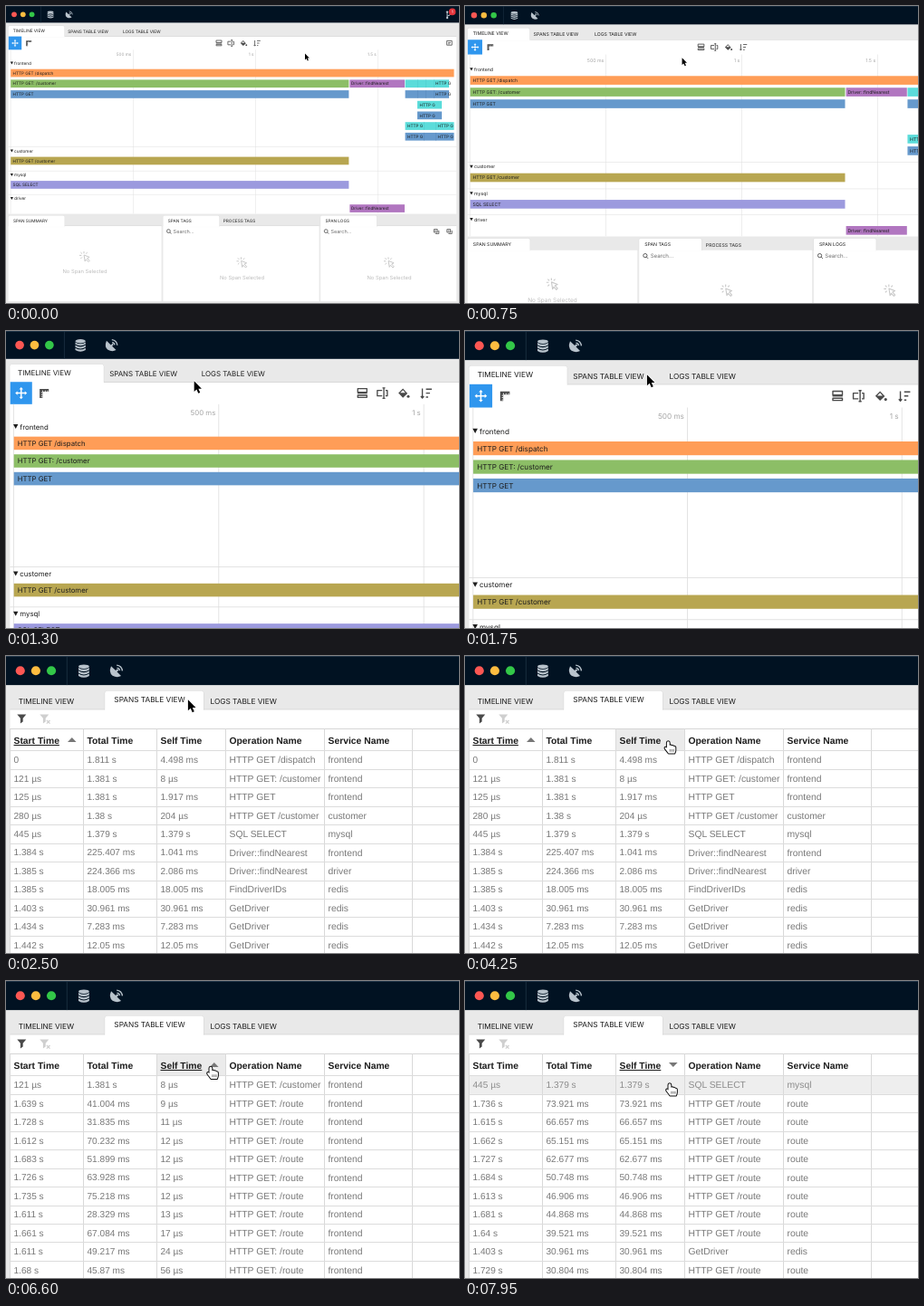
Animation, 500 px wide and 328 px high, one loop 8 s. Source, as an HTML page with a canvas:

```html
<!DOCTYPE html>
<html lang="en">
<head>
<meta charset="utf-8">
<title>Trace viewer</title>
<style>
html, body { margin: 0; width: 100%; height: 100%; overflow: hidden; background: #e9e9e9; }
canvas { display: block; width: 500px; height: 328px; }
</style>
</head>
<body>
<canvas id="stage" width="500" height="328"></canvas>
<script>
const ctx = document.getElementById('stage').getContext('2d');
const LOOP = 8000, ZOOM = 1.75;
const UI = 'Inter, "Open Sans", sans-serif';
const GRID = '"Liberation Sans", Arial, sans-serif';
const INK = '#1d1d1d', STRIP = '#e9e9e9', EDGE = '#d2d2d2', ICON = '#4a4a4a', PALE = '#b9c3cc';

// Moments of the interaction, in ms
const OPEN_TABLE = 1950, SORT_UP = 5500, SORT_DOWN = 7000;

const clamp = v => Math.min(1, Math.max(0, v));
const mix = (a, b, k) => a + (b - a) * k;
const progress = (t, start, length) => clamp((t - start) / length);
const swing = k => (1 - Math.cos(Math.PI * k)) / 2;
const easeOut = k => 1 - (1 - k) * (1 - k);

function box(color, x, y, w, h) {
  ctx.fillStyle = color;
  ctx.fillRect(x, y, w, h);
}

function disc(color, x, y, r) {
  ctx.fillStyle = color;
  ctx.beginPath();
  ctx.arc(x, y, r, 0, 7);
  ctx.fill();
}

// y is the middle of the capital letters
function label(str, x, y, size, color = INK, align = 'left', font = UI, weight = 400) {
  ctx.font = `${weight} ${size}px ${font}`;
  ctx.fillStyle = color;
  ctx.textAlign = align;
  ctx.fillText(str, x, y + size * 0.36);
}

// Draws an SVG path at a place, filled and/or stroked
function shape(d, x, y, { fill, stroke, width = 0.8, scale = 1 }) {
  const path = new Path2D(d);
  ctx.save();
  ctx.translate(x, y);
  ctx.scale(scale, scale);
  ctx.lineWidth = width;
  ctx.lineJoin = 'round';
  if (stroke) { ctx.strokeStyle = stroke; ctx.stroke(path); }
  if (fill) { ctx.fillStyle = fill; ctx.fill(path); }
  ctx.restore();
}

function tab(x, y, w, h) {
  ctx.beginPath();
  ctx.roundRect(x, y, w, h, [1.5, 1.5, 0, 0]);
  ctx.strokeStyle = EDGE;
  ctx.lineWidth = 0.5;
  ctx.stroke();
  ctx.fillStyle = '#fff';
  ctx.fill();
  ctx.fillRect(x, y + h - 0.5, w, 1.2);
}

function titleBar() {
  box('#011222', 0, 0, 500, 18.35);
  box('#2b4257', 0, 0, 500, 0.4);
  ['#fc5753', '#fdbc40', '#33c748'].forEach((c, i) => disc(c, 9 + i * 9.8, 9.3, 2.9));
  box('#23384b', 38.2, 0, 0.4, 18.35);

  // Database
  ctx.fillStyle = PALE;
  ctx.beginPath();
  ctx.ellipse(49.1, 6.7, 3.4, 1.3, 0, 0, 7);
  ctx.fill();
  for (let i = 0; i < 3; i++) {
    shape('M-3.4 0 Q0 2.2 3.4 0 V1.3 Q0 3.4 -3.4 1.3 Z', 49.1, 7.4 + i * 1.9, { fill: PALE });
  }

  // Dish
  shape('M-3.3 -3 Q-5 1 -2.4 3 Q0.4 4.6 3 3.2 L0.4 0.6 L1.4 -0.4 L0.6 -1.2 L-0.4 -0.2 Z', 69.6, 9.4, { fill: PALE });
  shape('M0.2 -3.6 Q3.4 -3.2 3.8 0 M0.4 -1.9 Q1.9 -1.7 2.1 -0.2', 69.6, 9.4, { stroke: PALE });

  // Branches with a notification badge
  shape('M-2 -2.5 V3 M2 -2 Q2 1 -2 1.5', 489, 9.6, { stroke: PALE, width: 1 });
  disc(PALE, 487, 6.6, 1.2);
  disc(PALE, 487, 13, 1.2);
  disc('#e2343b', 492.6, 6.4, 3.8);
  label('1', 492.6, 6.4, 4.6, '#fff', 'center');
}

function mainTabs(table) {
  box(STRIP, 0, 18.3, 500, 309.7);
  box(EDGE, 2.6, 33.5, 494.6, 0.5);
  box('#fff', 2.6, 34, 494.6, 195.6);
  if (table) tab(62.4, 22, 62.2, 12); else tab(2.6, 22, 61.8, 12);
  const names = ['TIMELINE VIEW', 'SPANS TABLE VIEW', 'LOGS TABLE VIEW'];
  [7.8, 68.2, 128.9].forEach((x, i) =>
    label(names[i], x, i === +table ? 27.6 : 28.3, 4.73));
}

function timelineTools() {
  box('#2f96ee', 2.8, 33.6, 14.4, 14.7);
  shape('M-3 0 H3 M0 -3 V3', 10, 41, { stroke: '#fff', width: 0.9 });
  for (let i = 0; i < 4; i++) {
    ctx.save();
    ctx.translate(10, 41);
    ctx.rotate(i * Math.PI / 2);
    shape('M-1.3 -2.4 L0 -3.9 L1.3 -2.4 Z', 0, 0, { fill: '#fff' });
    ctx.restore();
  }
  shape('M-2.8 3.2 V-2.8 H3.2 V-0.9 H-0.9 V3.2 Z', 25, 41, { fill: ICON });
  for (let i = 0; i < 3; i++) {
    box('#fff', 24 + i * 1.6, 39.2, 0.5, 0.9);
    box('#fff', 23.2, 40.4 + i * 1.4, 0.9, 0.5);
  }

  const line = { stroke: ICON, width: 0.8 };
  shape('M-3 -3 H3 V-0.6 H-3 Z M-3 2.8 H3 V1.4 H-3 Z', 235, 41, line);
  box(ICON, 231.8, 40.6, 6.4, 0.8);
  shape('M0.2 -1.8 H-3 V1.8 H0.2 M2.4 -1.8 H3.6 V1.8 H2.4 M0.4 -3.4 H2.2 M1.3 -3.4 V3.4 M0.4 3.4 H2.2',
    247.9, 41, line);
  shape('M-3 0 L0 -3 L3 0.2 L0 3 Z', 261.8, 41, { fill: ICON });
  shape('M-1.8 -0.2 L0 -2 L1.6 -0.2 Z', 261.8, 41, { fill: '#fff' });
  disc(ICON, 265.3, 43.2, 0.9);
  shape('M-2.4 -3 V3 M-3.4 2 L-2.4 3.2 L-1.4 2 M0 -2.6 H3.8 M0 0 H2.6 M0 2.6 H1.4', 277, 41, line);
  shape('M-2.8 -2.6 H2.8 V2.2 H-2.8 Z M-1.4 -0.6 H1.4 M-1.4 0.9 H0.4', 489.4, 41, line);
}

function bar(color, row, x, end, text = '', textX = x + 2.4) {
  box(color, x, row - 4.4, end - x, 8.7);
  if (text) label(text, textX, row, 4.65);
}

function timeline() {
  timelineTools();
  ['', '500 ms', '1 s', '1.5 s'].forEach((name, i) => {
    const x = 4.8 + i * 135.25;
    box('#dfdfdf', x, 48.3, 0.5, 181);
    label(name, x - 1.8, 53.8, 4.7, '#a5a5a5', 'right');
  });

  const groups = { frontend: 63, customer: 160, mysql: 186.5, driver: 212.5 };
  for (const [name, y] of Object.entries(groups)) {
    if (y > 63) box('#dedede', 2.6, y - 4.6, 494.6, 0.5);
    shape('M-1.6 -1.4 H1.6 L0 1.6 Z', 6.4, y, { fill: INK });
    label(name, 9.1, y + 0.2, 4.7);
  }

  const cyan = '#5bdcda', blue = '#6699cc', purple = '#b176c0';
  const row = i => 74.1 + i * 11.7;
  bar('#ff9d57', row(0), 5.2, 494.5, 'HTTP GET /dispatch');
  bar('#8cbe66', row(1), 5.2, 378.4, 'HTTP GET: /customer');
  bar(blue, row(2), 5.2, 378.4, 'HTTP GET');
  bar(purple, row(1), 379.4, 440, 'Driver::findNearest', 381);
  [cyan, blue].forEach((c, i) => {
    bar(c, row(1 + i), 440.6, 489, 'HTTP G', 474);
    bar(c, row(3 + i), 454, 481, 'HTTP G', 456.5);
    bar(c, row(5 + i), 440.6, 494.5, 'HTTP G', 443);
    label('HTTP G', 476.5, row(5 + i), 4.65);
    const edge = i ? '#5687bb' : '#4fc9ca';
    [454, 463.5, 472.5].forEach(x => box(edge, x, row(1 + i) - 4.4, 0.5, 8.7));
    [461, 474.5].forEach(x => box(edge, x, row(5 + i) - 4.4, 0.5, 8.7));
  });
  bar('#b8a651', 171, 5.2, 378.4, 'HTTP GET /customer');
  bar('#9c9ade', 197.5, 5.2, 378.4, 'SQL SELECT');
  bar(purple, 223.6, 379.4, 440, 'Driver::findNearest', 381);
}

function emptyNote(x, y) {
  const grey = '#c9c9c9';
  shape('M-1.5 -2 L4.5 0.4 L2 1.6 L4.6 4.4 L3.4 5.6 L0.8 2.8 L-0.4 5 Z', x + 0.6, y - 1, { stroke: grey, width: 1 });
  shape('M-1 -7 V-4.6 M-6 -2.6 H-3.6 M-4.6 -6 L-3 -4.4 M2.8 -6 L1.2 -4.4 M-4.6 1 L-3 -0.6', x, y,
    { stroke: grey, width: 1 });
  label('No Span Selected', x, y + 15.2, 5.8, '#bcbcbc', 'center');
}

function search(x) {
  ctx.strokeStyle = ICON;
  ctx.lineWidth = 0.8;
  ctx.beginPath();
  ctx.arc(x, 248.6, 1.9, 0, 7);
  ctx.moveTo(x + 1.4, 250);
  ctx.lineTo(x + 3, 251.6);
  ctx.stroke();
  label('Search...', x + 5.2, 249.2, 5.5, '#6c6c6c');
}

function detailPanels() {
  [[2.6, 171.6, 'SPAN SUMMARY'], [173.4, 345.6, 'SPAN TAGS'], [347.2, 497.2, 'SPAN LOGS']]
    .forEach(([x, end, name]) => {
      box(EDGE, x, 242.6, end - x, 0.5);
      box('#fff', x, 243.1, end - x, 83);
      tab(x, 231.6, 62, 12);
      label(name, x + 5.4, 237, 4.7);
    });
  label('PROCESS TAGS', 239.8, 237.8, 4.7);
  search(179.4);
  search(353.2);
  [475, 489.4].forEach(x =>
    shape('M-2.6 -2.4 H1.2 V1 H-2.6 Z M-1 2.4 H2.8 V-1 M-1.6 -0.7 H0.2', x, 249, { stroke: ICON, width: 0.8 }));
  emptyNote(87, 278);
  emptyNote(260.5, 284.4);
  emptyNote(423, 284.4);
}

const HEADS = ['Start Time', 'Total Time', 'Self Time', 'Operation Name', 'Service Name'];
const EDGES = [4, 85, 166, 242, 351, 448];
const ROW_TOP = 104.4, ROW = 20.45;

const table = str => str.trim().split('\n').map(r => r.split('|'));
const byStart = table(`
0|1.811 s|4.498 ms|HTTP GET /dispatch|frontend
121 µs|1.381 s|8 µs|HTTP GET: /customer|frontend
125 µs|1.381 s|1.917 ms|HTTP GET|frontend
280 µs|1.38 s|204 µs|HTTP GET /customer|customer
445 µs|1.379 s|1.379 s|SQL SELECT|mysql
1.384 s|225.407 ms|1.041 ms|Driver::findNearest|frontend
1.385 s|224.366 ms|2.086 ms|Driver::findNearest|driver
1.385 s|18.005 ms|18.005 ms|FindDriverIDs|redis
1.403 s|30.961 ms|30.961 ms|GetDriver|redis
1.434 s|7.283 ms|7.283 ms|GetDriver|redis
1.442 s|12.05 ms|12.05 ms|GetDriver|redis`);
const bySelfUp = table(`
121 µs|1.381 s|8 µs|customer
1.639 s|41.004 ms|9 µs
1.728 s|31.835 ms|11 µs
1.612 s|70.232 ms|12 µs
1.683 s|51.899 ms|12 µs
1.726 s|63.928 ms|12 µs
1.735 s|75.218 ms|12 µs
1.611 s|28.329 ms|13 µs
1.661 s|67.084 ms|17 µs
1.611 s|49.217 ms|24 µs
1.68 s|45.87 ms|56 µs`)
  .map(([start, total, self, path = 'route']) => [start, total, self, 'HTTP GET: /' + path, 'frontend']);
const bySelfDown = table(`
445 µs|1.379 s|SQL SELECT|mysql
1.736 s|73.921 ms
1.615 s|66.657 ms
1.662 s|65.151 ms
1.727 s|62.677 ms
1.684 s|50.748 ms
1.613 s|46.906 ms
1.681 s|44.868 ms
1.64 s|39.521 ms
1.403 s|30.961 ms|GetDriver|redis
1.729 s|30.804 ms`)
  .map(([start, time, op = 'HTTP GET /route', service = 'route']) => [start, time, time, op, service]);

// The table is only seen at full zoom, so it is laid out in stage pixels
function spansTable(t, pointer) {
  box('#fff', 5, 60, 495, 268);
  const funnel = 'M-5 -5 H5 L1.4 -0.6 V3 L-1.4 5 V-0.6 Z';
  shape(funnel, 17.3, 69.4, { fill: '#4a4a4a' });
  shape(funnel, 42.3, 69.4, { fill: '#cfcfcf' });
  shape('M2.6 1.6 L6.2 5.2 M6.2 1.6 L2.6 5.2', 42.3, 69.4, { stroke: '#cfcfcf', width: 1.3 });

  const sorted = t < SORT_UP ? 0 : 2;
  const rows = t < SORT_UP ? byStart : t < SORT_DOWN ? bySelfUp : bySelfDown;
  const headHover = pointer.y > 80 && pointer.y < ROW_TOP;
  const hoverRow = pointer.y > ROW_TOP ? Math.floor((pointer.y - ROW_TOP) / ROW) : -1;

  if (headHover) box('#ebebeb', EDGES[2], 80, EDGES[3] - EDGES[2], 24);
  if (hoverRow >= 0) box('#eeeeee', 4, ROW_TOP + hoverRow * ROW, 496, ROW);
  box('#d6d6d6', 4, 80, 496, 1);
  EDGES.forEach(x => box('#d9d9d9', x, 80, 1, 248));
  rows.forEach((_, i) => box('#dcdcdc', 4, Math.round(ROW_TOP + i * ROW), 496, 1));

  HEADS.forEach((name, i) => {
    const x = EDGES[i] + 4.5;
    label(name, x, 92.8, 10.35, INK, 'left', GRID, 700);
    if (i !== sorted) return;
    box(INK, x, 98, ctx.measureText(name).width, 1);
    const d = t < SORT_DOWN ? 'M0 5 L4.8 0 L9.6 5 Z' : 'M0 0 L4.8 5 L9.6 0 Z';
    shape(d, EDGES[i + 1] - 17, 90, { fill: '#777' });
  });
  rows.forEach((cells, r) => cells.forEach((cell, c) =>
    label(cell, EDGES[c] + 4.5, ROW_TOP + 10.2 + r * ROW, c < 3 ? 10.1 : 10.35,
      r === hoverRow ? '#8c8c8c' : '#787878', 'left', GRID)));
}

const ARROW = 'M0 0 V12.2 L2.8 9.6 L4.8 14.2 L6.9 13.2 L4.9 8.8 H8.6 Z';
const HAND = 'M-1.4 1.5 Q-1.4 0 0 0 Q1.4 0 1.4 1.5 V4.4 Q3 3.6 3.9 4.8 Q5.4 4.2 6.1 5.6 Q8 5.2 8 7 V9.6 ' +
  'Q8 11.4 7 13.2 H0.4 Q-0.8 11.4 -3.4 8.2 Q-4.2 6.6 -3 6.3 Q-2 6.4 -1.4 7.4 Z';

// Pointer tip in stage pixels
function pointerAt(t, zoom) {
  const x = mix(330, 114.8, easeOut(progress(t, 390, 1150))) * zoom;
  const y = mix(52.5, 27.5, swing(progress(t, 640, 960))) * zoom;
  const toHead = swing(progress(t, 3450, 650));
  const drift = swing(progress(t, 5000, 400));
  const toRow = swing(progress(t, 7600, 300));
  return {
    x: x + 23.4 * toHead + 1.6 * drift,
    y: y + 46.2 * toHead + 0.4 * drift + 18.5 * toRow
  };
}

function drawPointer({ x, y }, zoom) {
  const scale = zoom / ZOOM;
  if (y > 80 && zoom === ZOOM) {
    shape(HAND, x, y, { fill: '#fff', stroke: '#111', width: 2, scale });
    shape('M2 8.6 V11.4 M4 8.6 V11.4 M6 8.6 V11.4', x, y, { stroke: '#333', width: 0.7, scale });
  } else {
    shape(ARROW, x, y, { fill: '#000', stroke: '#fff', width: 1.8, scale });
  }
}

function draw(t) {
  const zoom = mix(1, ZOOM, swing(progress(t, 500, 1010)));
  const pointer = pointerAt(t, zoom);
  const inTable = t >= OPEN_TABLE;

  ctx.setTransform(zoom, 0, 0, zoom, 0, 0);
  ctx.textRendering = 'geometricPrecision';
  mainTabs(inTable);
  titleBar();
  if (!inTable) {
    timeline();
    detailPanels();
  }
  ctx.setTransform(1, 0, 0, 1, 0, 0);
  if (inTable) spansTable(t, pointer);
  drawPointer(pointer, zoom);
}

const begin = performance.now();
function frame() {
  draw((performance.now() - begin) % LOOP);
  requestAnimationFrame(frame);
}
frame();
</script>
</body>
</html>
```
